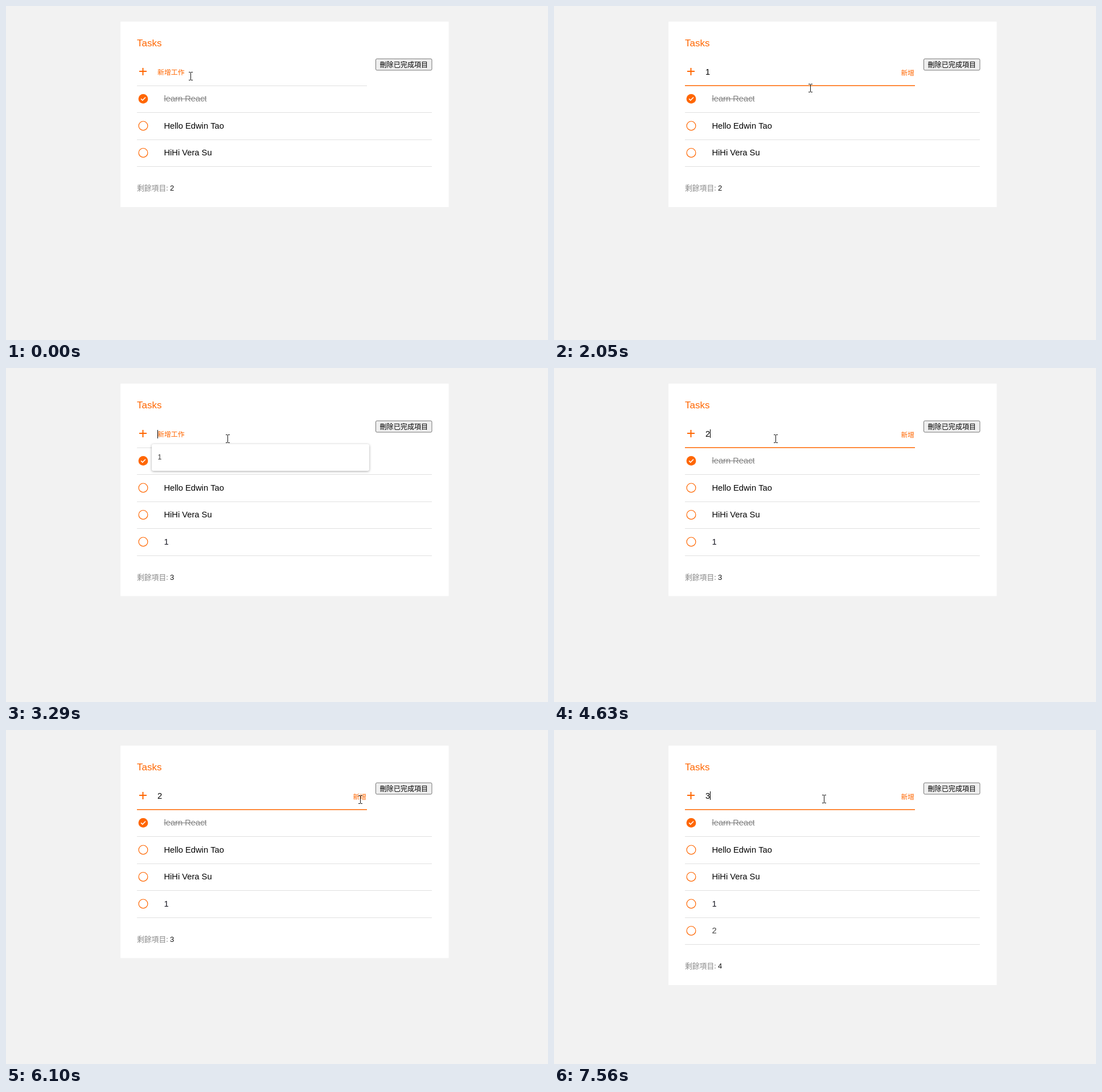
An HTML page with a canvas that plays this animation: 952 by 588 pixels, repeating every 8000 ms.

```html
<!DOCTYPE html>
<html lang="zh-Hant">
<head>
<meta charset="utf-8">
<title>Tasks</title>
<style>
  html, body { margin: 0; width: 100%; height: 100%; overflow: hidden; background: #f2f2f2; }
  canvas { display: block; width: 952px; height: 588px; }
</style>
</head>
<body>
<canvas id="stage" width="952" height="588"></canvas>
<script>
const ctx = document.getElementById('stage').getContext('2d');
const LOOP = 8000;
const ROW = 47.5;
const ORANGE = '#ff6600';
const LATIN = '"Liberation Sans", Arial, sans-serif';
const CJK = '"Noto Sans CJK TC", "Noto Sans CJK JP", "Noto Sans CJK", sans-serif';

const tasks = [
  { text: 'learn React', done: true, at: 0 },
  { text: 'Hello Edwin Tao', at: 0 },
  { text: 'HiHi Vera Su', at: 0 },
  { text: '1', at: 2830, color: '#161620' },
  { text: '2', at: 6180, color: '#444' }
];

// Value of the input field, visible caret and open suggestion list, by time.
const typed = [[1250, 2830, '1'], [4630, 6180, '2'], [7560, LOOP, '3']];
const caretOn = [[80, 620], [1180, 1720], [2270, 2750], [3210, 3770],
                 [4310, 5180], [5710, 6020], [6640, 7180], [7560, LOOP]];
const popupOn = [[160, 1180], [3290, 4630], [6720, 7560]];

// Pointer moves: start, number of steps, step length, way points.
const moves = [
  { at: 1950, steps: 6, dt: 82, pts: [[324, 123], [410, 140], [470, 146], [560, 134], [620, 112], [639, 126]] },
  { at: 2510, steps: 2, dt: 70, pts: [[639, 126], [632, 120], [632, 117]] },
  { at: 2750, steps: 1, dt: 70, pts: [[632, 117], [633, 113]] },
  { at: 2910, steps: 5, dt: 75, pts: [[633, 113], [570, 118], [450, 123], [389, 124]] },
  { at: 5180, steps: 11, dt: 76, pts: [[389, 124], [420, 115], [480, 112], [560, 122], [614, 134], [627, 128], [622, 122]] },
  { at: 6260, steps: 5, dt: 76, pts: [[622, 122], [585, 122], [510, 121], [474, 121]] }
];

const within = (t, spans) => spans.find(s => t >= s[0] && t < s[1]);

function along(pts, u) {
  const s = u * (pts.length - 1);
  const i = Math.min(Math.floor(s), pts.length - 2);
  const f = s - i;
  return [0, 1].map(k => pts[i][k] + (pts[i + 1][k] - pts[i][k]) * f);
}

function pointerAt(t) {
  const move = moves.filter(m => t >= m.at).pop();
  if (!move) return moves[0].pts[0];
  const step = Math.min(move.steps, Math.floor((t - move.at) / move.dt) + 1);
  return along(move.pts, step / move.steps);
}

function rect(x, y, w, h, color) {
  ctx.fillStyle = color;
  ctx.fillRect(x, y, w, h);
}

function label(str, x, y, size, color, family = LATIN) {
  ctx.font = `${size}px ${family}`;
  ctx.fillStyle = color;
  ctx.fillText(str, x, y);
}

function roundBox(x, y, w, h, r) {
  ctx.beginPath();
  ctx.roundRect(x, y, w, h, r);
}

function line(points, color, width) {
  ctx.beginPath();
  points.forEach(([x, y]) => ctx.lineTo(x, y));
  ctx.strokeStyle = color;
  ctx.lineWidth = width;
  ctx.stroke();
}

function drawTask(task, i) {
  const y = 163.4 + i * ROW;
  ctx.beginPath();
  ctx.arc(241, y, task.done ? 8.4 : 7.9, 0, Math.PI * 2);
  if (task.done) {
    ctx.fillStyle = ORANGE;
    ctx.fill();
    line([[237.2, y], [239.8, y + 2.6], [245, y - 2.6]], '#fff', 1.6);
  } else {
    ctx.strokeStyle = ORANGE;
    ctx.lineWidth = 1.2;
    ctx.stroke();
  }
  const color = task.done ? '#808080' : task.color || '#000';
  label(task.text, 277.5, Math.round(y + 4.6), 14.7, color);
  if (task.done) rect(277.5, 163, 75, 1, color);
  rect(230, Math.floor(187.5 + i * ROW), 518, 1, '#e0e0e0');
}

function drawHeader(value) {
  label('Tasks', 230, 71, 17, ORANGE);
  rect(234, 114, 13, 2, ORANGE);
  rect(239.5, 109, 2, 13, ORANGE);

  if (value) {
    label(value, 266, 120.5, 14.7, '#000');
    label('新增', 609.5, 121.5, 11.8, ORANGE, CJK);
    rect(230, 139.5, 404, 1.5, ORANGE);
  } else {
    label('新增工作', 266, 121, 11.9, ORANGE, CJK);
    rect(230, 140, 404, 1, '#e0e0e0');
  }

  roundBox(649.5, 93, 98.5, 20, 2);
  ctx.fillStyle = '#efefef';
  ctx.fill();
  ctx.strokeStyle = '#767676';
  ctx.lineWidth = 1;
  ctx.stroke();
  label('刪除已完成項目', 656.5, 107.5, 12.1, '#000', CJK);
}

function drawPopup() {
  ctx.save();
  ctx.shadowColor = 'rgba(0,0,0,.35)';
  ctx.shadowBlur = 4;
  ctx.shadowOffsetY = 1;
  roundBox(256, 134, 382, 47, 3);
  ctx.fillStyle = '#fff';
  ctx.fill();
  ctx.restore();
  label('1', 266.5, 161, 12.2, '#333');
}

function drawPointer([px, py]) {
  const x = Math.round(px), y = Math.round(py);
  rect(x, y - 6, 1, 13, '#111');
  for (const end of [y - 7, y + 7]) {
    rect(x - 3, end, 3, 1, '#111');
    rect(x + 1, end, 3, 1, '#111');
  }
}

function draw(t) {
  const list = tasks.filter(task => t >= task.at);
  const extra = (list.length - 3) * ROW;
  const field = within(t, typed);

  rect(0, 0, 952, 588, '#f2f2f2');
  rect(201, 27.5, 576.5, 326.5 + extra, '#fff');
  drawHeader(field && field[2]);
  list.forEach(drawTask);

  const foot = Math.round(325 + extra);
  label('剩餘項目:', 230, foot, 12.8, '#888', CJK);
  label(String(list.length - 1), 288, foot, 13, '#111');

  if (within(t, popupOn)) drawPopup();
  if (within(t, caretOn)) {
    if (field) rect(274, 108, 1, 15, '#000');
    else rect(266, 109, 1, 15, '#000');
  }
  drawPointer(pointerAt(t));
}

const start = performance.now();
function tick() {
  draw((performance.now() - start) % LOOP);
  requestAnimationFrame(tick);
}
tick();
</script>
</body>
</html>
```
